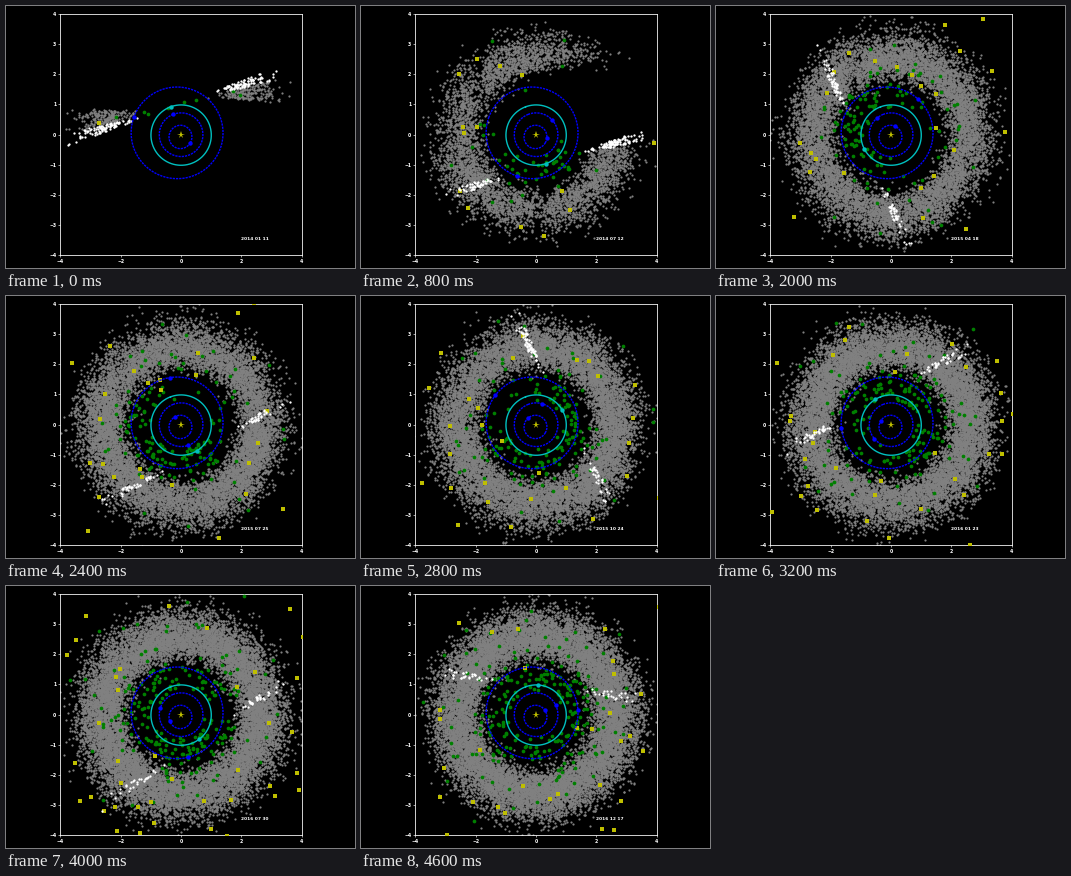
Animation of 349 by 262 pixels, one loop 4700 ms. Source, as a matplotlib script:

```python
import numpy as np
import matplotlib.pyplot as plt
from matplotlib.animation import FuncAnimation

W, H, DPI = 349, 262, 100
FRAMES, INTERVAL = 47, 100
PX = 72 / DPI
START = np.datetime64("2014-01-11")
EPOCH = 5123.5          # days from J2000 to START
FIRST_WEEK, LAST_WEEK = -3, 153
rng = np.random.default_rng(14)


def kepler_xy(orbit, day):
    """Ecliptic x, y for orbits (a, e, perihelion longitude, mean anomaly)."""
    a, e, peri, m0 = orbit
    m = m0 + 0.0172021 * a ** -1.5 * day
    m = (m + np.pi) % (2 * np.pi) - np.pi
    E = m + e * np.sin(m)
    for _ in range(5):
        E = E - (E - e * np.sin(E) - m) / (1 - e * np.cos(E))
    x, y = a * (np.cos(E) - e), a * np.sqrt(1 - e * e) * np.sin(E)
    c, s = np.cos(peri), np.sin(peri)
    return np.array([c * x - s * y, s * x + c * y])


def planet(a, e, peri, lon):
    peri, lon = np.radians([peri, lon])
    return a, e, peri, lon - peri + 0.0172021 * a ** -1.5 * EPOCH


MERCURY = planet(0.3871, 0.2056, 77.46, 252.25)
VENUS = planet(0.7233, 0.0068, 131.6, 181.98)
EARTH = planet(1.0, 0.0167, 102.94, 100.46)
MARS = planet(1.5237, 0.0934, 336.06, 355.45)


def angles(n):
    return rng.uniform(0, 2 * np.pi, n)


def main_belt(n):
    a = rng.choice([2.36, 2.64, 3.05], n, p=[0.32, 0.36, 0.32])
    a = a + rng.uniform(-0.15, 0.15, n)
    e = np.clip(rng.rayleigh(0.12, n), 0, 0.38)
    return a, e, angles(n), angles(n)


def near_earth(n):
    q, e = rng.uniform(0.75, 1.3, n), rng.uniform(0.15, 0.65, n)
    return q / (1 - e), e, angles(n), angles(n)


def comets(n):
    a, q = rng.uniform(3.2, 7, n), rng.uniform(1.1, 3, n)
    passage = rng.uniform(-500, 1600, n)
    return a, 1 - q / a, angles(n), -0.0172021 * a ** -1.5 * passage


def first_seen(orbit, chance, reach, power, plane=True):
    """Week in which each body first crosses the survey's 90-degree scan line."""
    n = len(orbit[0])
    seen = np.full(n, 9999)
    before = None
    for week in range(FIRST_WEEK, LAST_WEEK + 1):
        earth = kepler_xy(EARTH, 7 * week)
        view = kepler_xy(orbit, 7 * week) - earth[:, None]
        side = earth @ view > 0
        if before is not None:
            dist = np.hypot(*view)
            p = chance * np.exp(-(dist / reach) ** power)
            if plane:   # crowded star fields hide faint bodies
                p = p * (1 - 0.85 * np.exp(-(view[0] / dist / 0.12) ** 2))
            hit = (side != before) & (rng.random(n) < p) & (seen == 9999)
            seen[hit] = week
        before = side
    return seen


belt, neos, icy = main_belt(22000), near_earth(900), comets(110)
belt_seen = first_seen(belt, 0.6, 2.9, 2)
neo_seen = first_seen(neos, 0.6, 0.8, 1, plane=False)
icy_seen = first_seen(icy, 0.5, 4, 2, plane=False)

fig = plt.figure(figsize=(W / DPI, H / DPI), dpi=DPI, facecolor="black")
SIDE = 241.4
ax = fig.add_axes([54.3 / W, 12.7 / H, SIDE / W, SIDE / H], facecolor="black")
ax.set(xlim=(-4, 4), ylim=(-4, 4))
ax.tick_params(colors="white", length=2 * PX, width=0.6 * PX, pad=2 * PX)
for label in ax.get_xticklabels() + ax.get_yticklabels():
    label.set(fontsize=4.6 * PX, fontweight="bold", family="DejaVu Sans")
for spine in ax.spines.values():
    spine.set(color="white", linewidth=0.8 * PX)


def dots(color, marker, size, z):
    return ax.plot([], [], marker, color=color, ms=size * PX, mew=0, zorder=z)[0]


gray = dots("gray", "o", 2.2, 2)
green = dots("g", "o", 3.7, 3)
yellow = dots("y", "s", 3.6, 4)
white = dots("white", "o", 2.3, 5)
ax.plot(0, 0, "*", color="y", ms=7.5 * PX, mew=0, zorder=6)

movers = []
for body, color, style, width in ((MERCURY, "b", (0, (1.6, 0.7)), 1.4),
                                  (VENUS, "b", (0, (1.6, 0.7)), 1.4),
                                  (EARTH, "c", "-", 1.4),
                                  (MARS, "b", (0, (1.6, 0.7)), 1.4)):
    year = 365.256 * body[0] ** 1.5
    ax.plot(*kepler_xy(body, np.linspace(0, year, 240)), color=color,
            ls=style, lw=width * PX, zorder=7)
    movers.append((body, dots(color, "o", 4.4, 8)))

date = ax.text(2, -3.5, "", color="white", fontsize=4.4 * PX,
               fontweight="bold", family="DejaVu Sans", zorder=9)


def update(i):
    week = 10 * i // 3
    day = 7 * week
    xy = kepler_xy(belt, day)
    gray.set_data(*xy[:, belt_seen < week])
    white.set_data(*xy[:, belt_seen == week])
    green.set_data(*kepler_xy(neos, day)[:, neo_seen <= week])
    yellow.set_data(*kepler_xy(icy, day)[:, icy_seen <= week])
    for body, mark in movers:
        x, y = kepler_xy(body, day)
        mark.set_data([x], [y])
    date.set_text(str(START + day).replace("-", " "))


anim = FuncAnimation(fig, update, frames=FRAMES, init_func=lambda: None,
                     interval=INTERVAL, repeat=True, repeat_delay=0)
plt.show()
```
